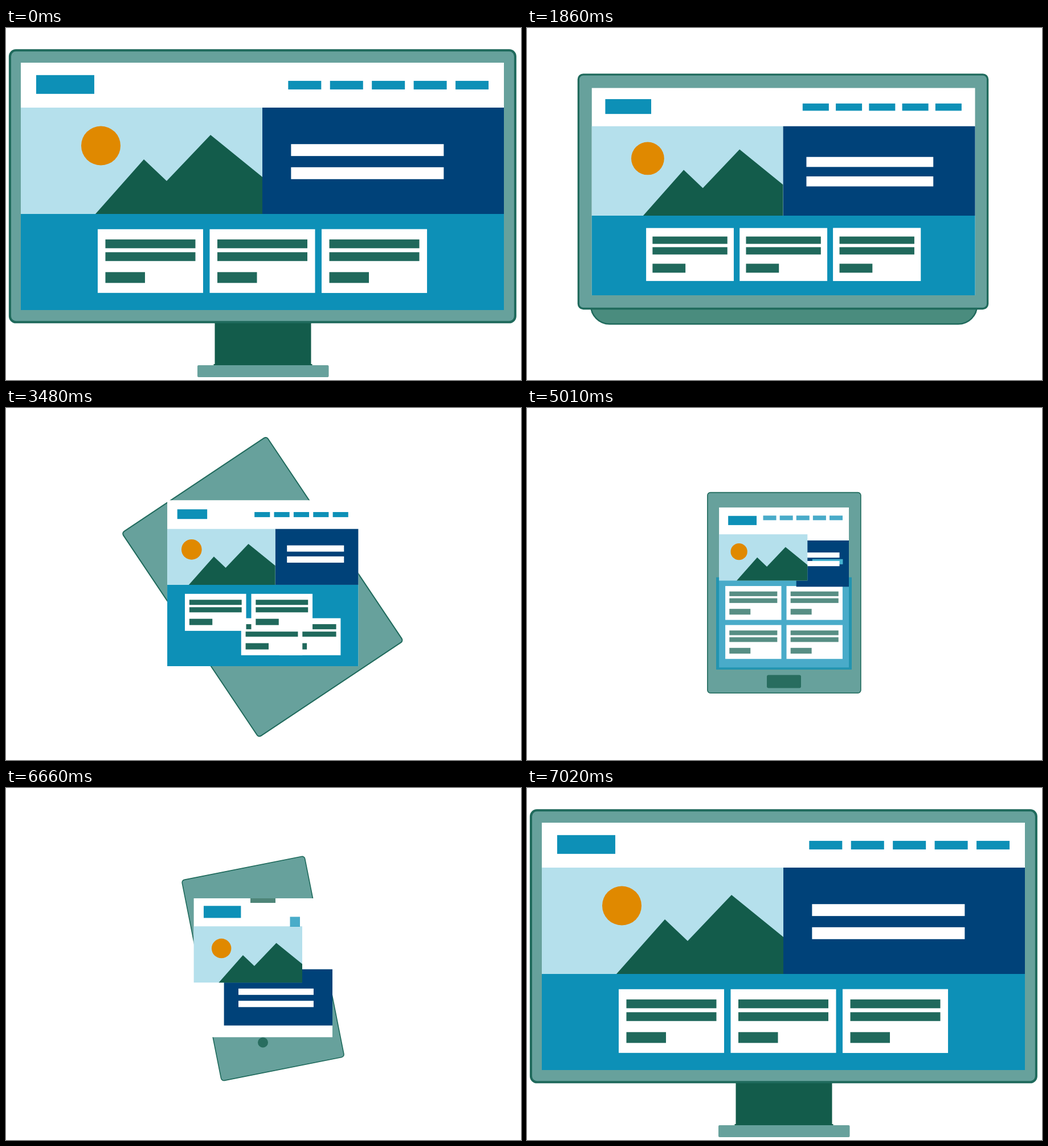
These frames come from a looping animation (904 px wide and 619 px high, 7050 ms). An HTML page with a canvas:

```html
<!DOCTYPE html>
<html lang="en">
<head>
<meta charset="utf-8">
<title>Responsive page</title>
<style>
html, body { margin: 0; width: 100%; height: 100%; overflow: hidden; background: #fff; }
canvas { display: block; }
</style>
</head>
<body>
<canvas id="stage" width="904" height="619"></canvas>
<script>
const LOOP = 7050, STEP = 30, MORPH = 240, FADE = 120;
const BODY = '#67a19c', LINE = '#1f6a5c', GREEN = '#135c4b', BAR = '#20695c',
      BLUE = '#0d90b7', NAVY = '#004279', SKY = '#b5e0ec', SUN = '#e08900';

// body: centre, long side, short side; screen: x, y, w, h.
// logo and card are scales, split is the photo's share of the width.
const DEVICES = [
  { body: [450.4, 278.3, 891, 482], turn: 0, screen: [26, 61, 848, 435],
    header: 79, band: 187, split: 0.5, logo: 1, text: 268, lines: 2, card: 1, cols: 3 },
  { body: [448.5, 297, 552, 348], turn: 0, screen: [201.5, 150, 497.5, 294],
    header: 55.5, band: 127.5, split: 0.497, logo: 0.58, text: 177.5, lines: 2, card: 0.663, cols: 3 },
  { body: [451.4, 325.2, 364, 283], turn: 90, screen: [332, 169.5, 238, 290.5],
    header: 47.5, band: 80.7, split: 0.651, logo: 0.475, text: 53.6, lines: 3, card: 0.532, cols: 2 },
  { body: [451.2, 323, 286, 184], turn: 90, screen: [373, 213, 157, 217],
    header: 45, band: 86.3, split: 1, logo: 0.59, text: 112.5, lines: 2, card: 0.532, cols: 2 }
];
const [TO_LAPTOP, TO_TABLET, TO_PHONE, TO_DESKTOP] = [1740, 3330, 4980, 6630];
const STARTS = [TO_LAPTOP, TO_TABLET, TO_PHONE, TO_DESKTOP];

const ctx = document.getElementById('stage').getContext('2d');
const layer = document.createElement('canvas');
layer.width = 904;
layer.height = 619;
const lctx = layer.getContext('2d');

const clamp = v => Math.max(0, Math.min(1, v));
const ramp = (t, start, len = FADE) => clamp((t - start) / len);
const mix = (a, b, p) => Array.isArray(a) ? a.map((v, i) => mix(v, b[i], p)) : a + (b - a) * p;
const range = n => [...Array(n).keys()];

// Works out every box (x, y, w, h) of the page on one device.
function layout(d) {
  const [x, y, w, h] = d.screen;
  const margin = Math.max(16, 11 + w * 0.0188);
  const top = y + d.header, bottom = top + d.band;
  const photoW = w * d.split;
  const stacked = d.split === 1;
  const hero = stacked ? [x, bottom, w, d.band] : [x + photoW, top, w - photoW, d.band];

  const pitch = d.band / (d.lines + 2.6), lineH = d.band * 0.112;
  const middle = hero[1] + d.band * (0.56 - 0.026 * d.lines);
  const line = i => [hero[0] + 5 + hero[2] * 0.107,
    middle + (i - (d.lines - 1) / 2) * pitch - lineH / 2, d.text, lineH];

  const navW = Math.max(23, w * 0.0684), navH = 3.5 + navW * 0.2;
  const nav = range(5).map(i => [x + w - margin - navW * (1 + 1.266 * (4 - i)),
    y + d.header / 2 - navH / 2, navW, navH]);

  const cw = 185 * d.card, ch = 112 * d.card, gap = Math.max(9, w * 0.0136);
  const rows = d.cols === 3 ? 1 : 2;
  const left = x + w / 2 - (d.cols * (cw + gap) - gap) / 2;
  const first = (bottom + y + h) / 2 - (rows * (ch + gap) - gap) / 2 - 1.7;
  const cards = range(4).map(i => {
    const row = rows === 2 && i > 1 ? 1 : 0;
    const col = row ? 3 - i : Math.min(i, 2);
    return [left + col * (cw + gap), first + row * (ch + gap), d.card];
  });

  return {
    body: d.body, turn: d.turn, screen: d.screen, hero, nav, cards,
    photo: [x, top, photoW, d.band],
    art: Math.min(d.band / 187, photoW / 366),
    logo: [x + margin, y + d.header * 0.485 - 16.5 * d.logo, 102 * d.logo, 33 * d.logo],
    lines: [line(0), line(1)], extra: line(2),
    panel: [x, bottom, w, y + h - bottom]
  };
}
const PAGES = DEVICES.map(layout);

function fillBox(c, box, color) {
  c.fillStyle = color;
  c.fillRect(...box);
}

function fillRound(x, y, w, h, r, color) {
  ctx.beginPath();
  ctx.roundRect(x, y, w, h, r);
  ctx.fillStyle = color;
  ctx.fill();
}

function withAlpha(a, draw) {
  if (a <= 0) return;
  ctx.save();
  ctx.globalAlpha = a;
  draw();
  ctx.restore();
}

function drawStand(shown) {
  if (shown <= 0) return;
  ctx.save();
  ctx.translate(0, -97 * (1 - shown));
  fillBox(ctx, [366.5, 500, 169, 93], GREEN);
  fillBox(ctx, [364.5, 591, 173, 2], GREEN);
  fillRound(336, 593, 230.5, 21, 2, BODY);
  ctx.restore();
}

function drawBase() {
  ctx.beginPath();
  ctx.roundRect(112, 470.5, 678, 50, [0, 0, 33, 33]);
  ctx.fillStyle = '#4a8c7e';
  ctx.fill();
  ctx.strokeStyle = LINE;
  ctx.lineWidth = 2.5;
  ctx.stroke();
}

function drawBody([cx, cy, long, short], turn) {
  const stroke = Math.max(1.6, long / 220);
  const w = long - stroke, h = short - stroke;
  ctx.save();
  ctx.translate(cx, cy);
  ctx.rotate(turn * Math.PI / 180);
  ctx.beginPath();
  ctx.roundRect(-w / 2, -h / 2, w, h, Math.max(5, long / 85));
  ctx.fillStyle = BODY;
  ctx.fill();
  ctx.strokeStyle = LINE;
  ctx.lineWidth = stroke;
  ctx.stroke();
  ctx.restore();
}

function drawCard([x, y, s]) {
  lctx.save();
  lctx.translate(x, y);
  lctx.scale(s, s);
  fillBox(lctx, [0, 0, 185, 112], '#fff');
  for (const top of [18, 40.5]) fillBox(lctx, [13.5, top, 158, 15.5], BAR);
  fillBox(lctx, [13.5, 75.5, 69.5, 19], BAR);
  lctx.restore();
}

// Nav, lower panel and cards fade as one group.
function drawContent(page, alpha) {
  if (alpha <= 0) return;
  lctx.clearRect(0, 0, 904, 619);
  for (const box of [...page.nav, page.panel]) fillBox(lctx, box, BLUE);
  for (const i of [2, 3, 0, 1]) drawCard(page.cards[i]);
  withAlpha(alpha, () => ctx.drawImage(layer, 0, 0));
}

function drawPhoto(box, s) {
  fillBox(ctx, box, SKY);
  ctx.save();
  ctx.translate(box[0] + box[2], box[1] + box[3]);
  ctx.scale(s, s);
  ctx.beginPath();
  ctx.arc(-283.5, -120, 34.5, 0, Math.PI * 2);
  ctx.fillStyle = SUN;
  ctx.fill();
  ctx.beginPath();
  for (const [x, y] of [[-293, 0], [-208, -96], [-168, -58], [-91, -139], [0, -65], [0, 0]])
    ctx.lineTo(x, y);
  ctx.fillStyle = GREEN;
  ctx.fill();
  ctx.restore();
}

function pageAt(t) {
  const i = STARTS.filter(s => t >= s).length;
  if (!i) return PAGES[0];
  const from = PAGES[i - 1], to = PAGES[i % 4], p = ramp(t, STARTS[i - 1], MORPH);
  return Object.fromEntries(Object.keys(from).map(k => [k, mix(from[k], to[k], p)]));
}

function draw(t) {
  const page = pageAt(t);
  // The phone has no lower content; it fades where it stands.
  const content = t < TO_PHONE ? page : PAGES[t < TO_DESKTOP ? 2 : 0];
  const contentAlpha = 1 - ramp(t, TO_PHONE) + ramp(t, 6840);
  const notch = ramp(t, 1950) - ramp(t, TO_TABLET);
  const tablet = ramp(t, 3540) - ramp(t, TO_PHONE);
  const phone = ramp(t, 5160) - ramp(t, TO_DESKTOP);

  fillBox(ctx, [0, 0, 904, 619], '#fff');
  drawStand(1 - ramp(t, 1500, MORPH) + ramp(t, 6870, 150));
  if (t > TO_LAPTOP) withAlpha(1 - ramp(t, TO_TABLET), drawBase);
  drawBody(page.body, page.turn);
  fillBox(ctx, page.screen, '#fff');
  drawContent(content, contentAlpha);
  fillBox(ctx, page.logo, BLUE);

  fillBox(ctx, page.hero, NAVY);
  withAlpha(tablet, () => fillBox(ctx, PAGES[2].extra, '#5dd7ed'));
  for (const box of page.lines) fillBox(ctx, box, '#fff');
  drawPhoto(page.photo, page.art);

  withAlpha(notch, () => fillRound(376, 471, 150, 19.5, [0, 0, 10, 10], GREEN));
  withAlpha(tablet, () => fillRound(421, 469.5, 60, 23, 3, GREEN));
  withAlpha(phone, () => {
    fillBox(ctx, [429, 194, 44, 8], GREEN);
    fillBox(ctx, [498.5, 226.5, 17.5, 17.5], BLUE);
    fillRound(442, 438.5, 18, 18, 9, GREEN);
  });
}

const origin = performance.now();
function tick() {
  const t = (performance.now() - origin) % LOOP;
  draw(Math.floor(t / STEP) * STEP);
  requestAnimationFrame(tick);
}
tick();
</script>
</body>
</html>
```
